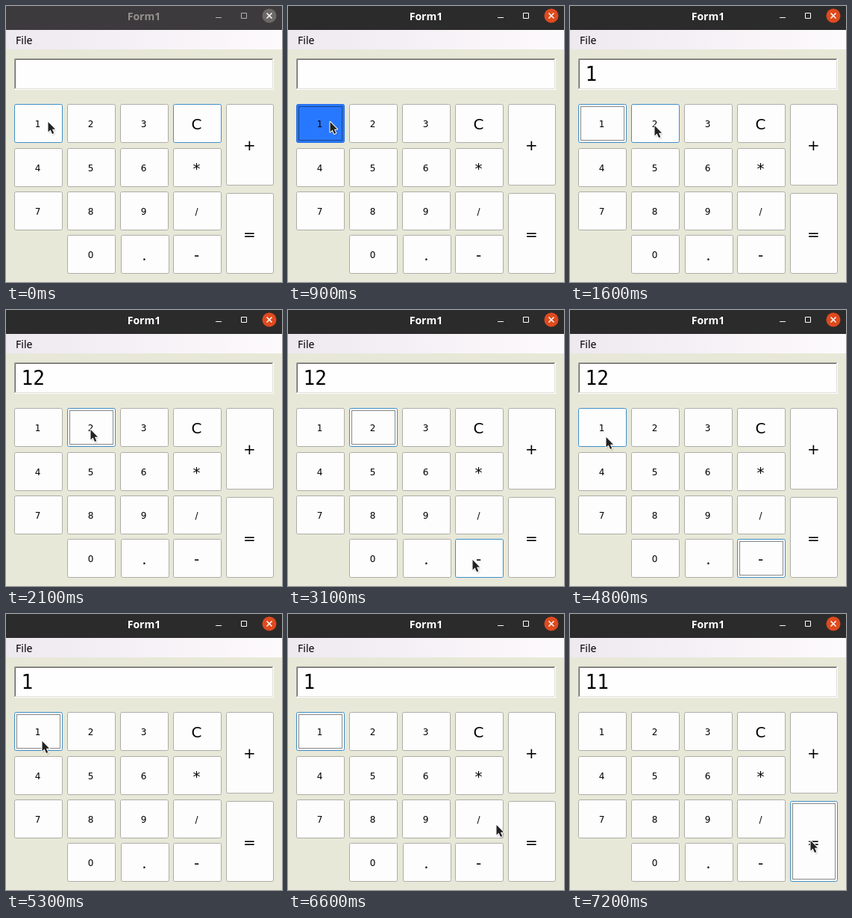
An HTML page that plays this animation: 370 px wide and 369 px high, repeating every 8000 ms.

```html
<!DOCTYPE html>
<html lang="en">
<head>
<meta charset="utf-8">
<title>Calculator</title>
<style>
  html, body { margin: 0; width: 100%; height: 100%; overflow: hidden; background: #e8e8d8; }
  svg { display: block; width: 370px; height: 369px; }
  text { font-family: "DejaVu Sans", sans-serif; }
  .label { text-anchor: middle; font-size: 12px; }
  .label.big { font-size: 20px; }
  .face { fill: #fdfdfd; stroke: #adada9; }
  .hot .face { stroke: #3f8fc8; }
  .down .face { fill: #2878ff; stroke: #2470ea; }
  .focus { fill: none; stroke: #111; stroke-dasharray: 1 1; visibility: hidden; }
  .focused .focus { visibility: visible; }
  .bar { fill: #3c3a3c; }
  .title { font: bold 14px "Open Sans", sans-serif; text-anchor: middle; fill: #93908d; }
  .glyph { fill: none; stroke: #b5b2b0; }
  .close { fill: #6b6867; }
  .active .bar { fill: #2c2b2c; }
  .active .title { fill: #fff; }
  .active .glyph { stroke: #fff; }
  .active .close { fill: #df4a1e; }
  .menu { font: 14px "Noto Sans", sans-serif; }
  .value { font: 26px "DejaVu Sans Mono", monospace; }
</style>
</head>
<body>
<svg viewBox="0 0 370 369">
  <defs>
    <linearGradient id="menuFill">
      <stop offset="0" stop-color="#ede9ef"/>
      <stop offset="1" stop-color="#fdfafd"/>
    </linearGradient>
    <filter id="soft" x="-50%" y="-50%" width="200%" height="200%">
      <feGaussianBlur stdDeviation="1"/>
    </filter>
    <path id="arrow" d="M1.5 2V15.5L4.6 12.6L7 18L9.3 17L6.9 11.8H11Z"/>
  </defs>
  <rect width="370" height="369" fill="#e8e8d8"/>
  <g id="frame">
    <rect class="bar" width="370" height="32"/>
    <text class="title" x="185" y="19">Form1</text>
    <path class="glyph" d="M281 15.5H289M315.5 9.5H322.5V16.5H315.5Z"/>
    <circle class="close" cx="353" cy="13" r="9.5"/>
    <path d="M349.5 9.5L356.5 16.5M356.5 9.5L349.5 16.5" stroke="#fff" stroke-width="1.5"/>
  </g>
  <rect y="32" width="370" height="26" fill="url(#menuFill)"/>
  <text class="menu" x="13" y="51">File</text>
  <g fill="none">
    <rect x="11" y="70" width="348" height="42" fill="#fefefe"/>
    <path d="M11.5 111V70.5H358" stroke="#a0a09c"/>
    <path d="M12.5 110V71.5H357" stroke="#696969"/>
    <path d="M13 110.5H357.5V72" stroke="#dededa"/>
  </g>
  <text class="value" id="value" x="20.5" y="100"></text>
  <g id="keys"></g>
  <g id="cursor">
    <use href="#arrow" x="1" y="1.5" fill="#000" opacity=".4" filter="url(#soft)"/>
    <use href="#arrow" fill="#222" stroke="#fff" stroke-width="2" stroke-linejoin="round" style="paint-order: stroke"/>
  </g>
</svg>
<script>
const LOOP = 8000;
const SVG = "http://www.w3.org/2000/svg";
const $ = id => document.getElementById(id);

function add(parent, tag, attrs, content = "") {
  const node = document.createElementNS(SVG, tag);
  for (const name in attrs) node.setAttribute(name, attrs[name]);
  node.textContent = content;
  return parent.appendChild(node);
}

const columns = [11, 82, 153, 224, 295];
const rows = [131, 190, 248, 306];
const keys = {};

function addKey(name, x, y, height = 52) {
  const group = add($("keys"), "g", {});
  const big = "C*+=.-".includes(name);
  const box = (cls, inset, rx) => add(group, "rect", {
    class: cls, x: x + inset, y: y + inset, rx,
    width: 65 - 2 * inset - (x === 295 ? 1 : 0), height: height - 2 * inset
  });
  box("face", 0.5, 2);
  box("focus", 3.5, 0);
  add(group, "text", {
    class: big ? "label big" : "label",
    x: x + 31.5, y: y + height / 2 + (big ? 7.5 : 5)
  }, name);
  keys[name] = group;
}

["123C", "456*", "789/", " 0.-"].forEach((line, r) =>
  [...line].forEach((name, c) => {
    if (name !== " ") addKey(name, columns[c] + (name === "." ? 1 : 0), rows[r]);
  }));
addKey("+", columns[4], 131, 109);
addKey("=", columns[4], 250, 108);

// Each step lists only what changes at its time.
const press = key => ({ active: true, focus: key, down: key });
const release = value => ({ down: "", value });
const move = (x, y, hover = "") => ({ x, y, hover });
const steps = [
  [0, { ...move(55, 153, "1"), active: false, focus: "C", down: "", value: "" }],
  [900, press("1")],
  [1000, release("1")],
  [1400, move(70, 155)],
  [1500, move(95, 157)],
  [1600, move(112, 158, "2")],
  [1900, press("2")],
  [2100, release("12")],
  [2500, move(127, 162, "2")],
  [2700, move(116, 188)],
  [2800, move(140, 233)],
  [2900, move(185, 280)],
  [3000, move(227, 317)],
  [3100, move(246, 332, "-")],
  [3700, press("-")],
  [3900, release("12")],
  [4300, move(195, 299)],
  [4400, move(140, 255)],
  [4500, move(95, 215)],
  [4600, move(66, 188)],
  [4700, move(52, 173)],
  [4800, move(47, 168, "1")],
  [5100, press("1")],
  [5300, release("1")],
  [6300, move(60, 174)],
  [6400, move(130, 205)],
  [6500, move(215, 250)],
  [6600, move(278, 280)],
  [6700, move(310, 297)],
  [6800, move(321, 301, "=")],
  [7000, press("=")],
  [7200, release("11")]
];

function render(time) {
  const state = Object.assign({}, ...steps.filter(([at]) => at <= time).map(([, change]) => change));
  $("frame").classList.toggle("active", state.active);
  $("value").textContent = state.value;
  $("cursor").setAttribute("transform", `translate(${state.x} ${state.y})`);
  for (const name in keys) {
    const list = keys[name].classList;
    list.toggle("hot", name === state.hover || name === state.focus);
    list.toggle("focused", state.active && name === state.focus);
    list.toggle("down", name === state.down);
  }
}

const start = performance.now();
function tick() {
  render((performance.now() - start) % LOOP);
  requestAnimationFrame(tick);
}
tick();
</script>
</body>
</html>
```
